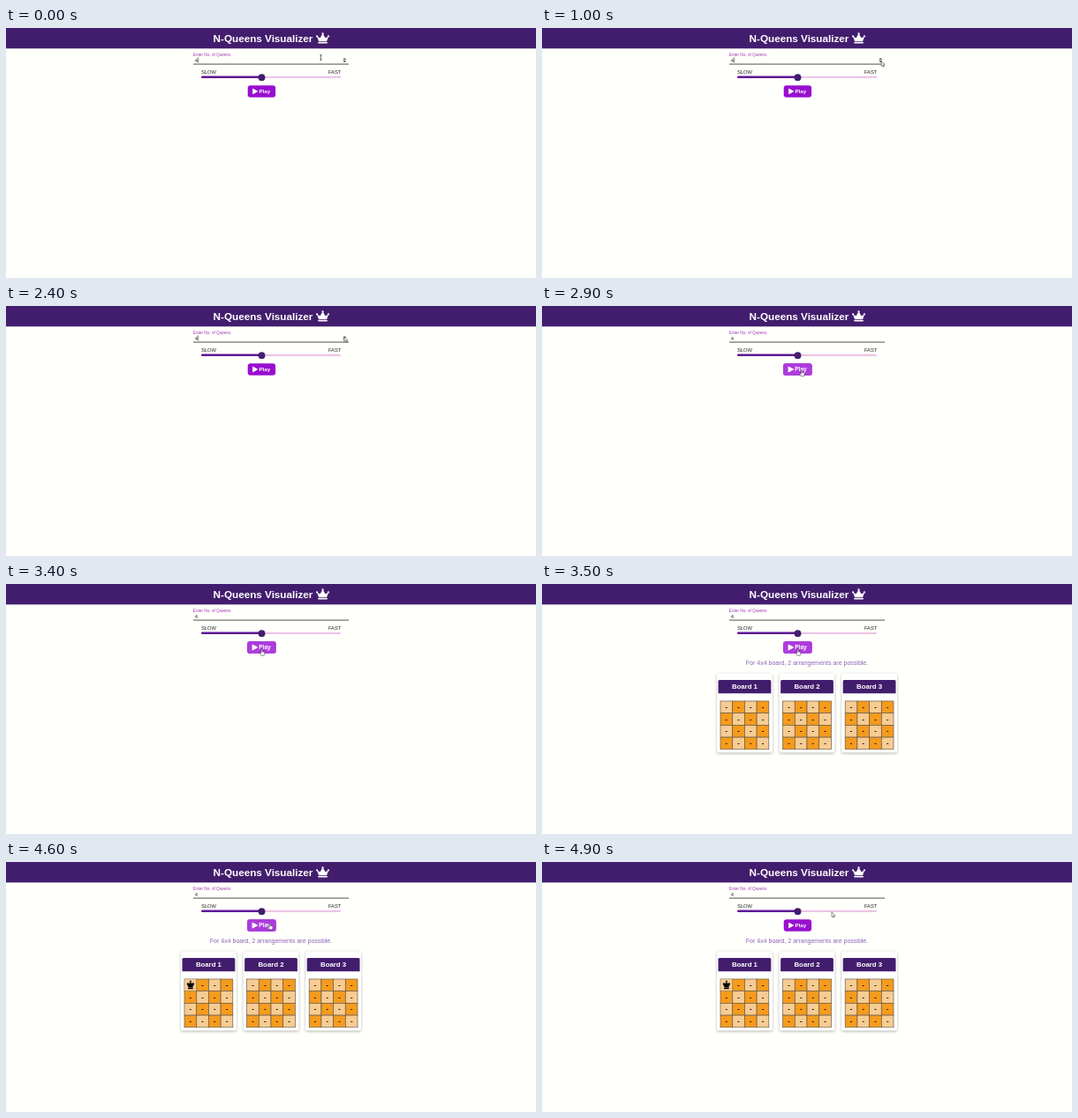
Write an HTML page that moves like this. It is 600x284 px and loops after 5000 ms.

```html
<!DOCTYPE html>
<html lang="en">
<head>
<meta charset="utf-8">
<title>N-Queens Visualizer</title>
<style>
  html, body { margin: 0; width: 100%; height: 100%; overflow: hidden; background: #fffffc; }
  svg { display: block; width: 600px; height: 284px; font-family: "Liberation Sans", Arial, sans-serif; }
  .bold { font-weight: bold; }
  .mid { text-anchor: middle; }
  .card { filter: drop-shadow(0 1px 1.5px rgba(0, 0, 0, .3)); }
</style>
</head>
<body>
<svg viewBox="0 0 600 284">
  <defs>
    <g id="crown">
      <path d="M128 416L56 222L92 196L164 239Q192 252 208 228L290 85H350L432 228Q448 252 476 239L548 196L584 222L512 416Z"/>
      <rect x="96" y="448" width="448" height="64" rx="16"/>
      <circle cx="48" cy="176" r="48"/><circle cx="320" cy="48" r="48"/><circle cx="592" cy="176" r="48"/>
    </g>
  </defs>

  <rect width="600" height="23.3" fill="#431d6d"/>
  <text class="bold" x="234.6" y="15.6" font-size="11.7" fill="#fff">N-Queens Visualizer</text>
  <use href="#crown" transform="translate(351 5.3) scale(.0236)" fill="#fff"/>

  <text x="211.8" y="31.6" font-size="4.7" fill="#a23bb5">Enter No. of Queens</text>
  <text x="213.7" y="38.5" font-size="5.9" fill="#222">4</text>
  <rect id="caret" x="216.9" y="33.4" width=".6" height="6" fill="#222"/>
  <g id="spin">
    <rect x="381" y="33.6" width="4.6" height="6" fill="#efefef"/>
    <path d="M381.6 36.1L383.3 34.2L385 36.1ZM381.6 37.1L383.3 39L385 37.1Z" fill="#444"/>
  </g>
  <rect x="212" y="40.6" width="176" height=".9" fill="#3a3a3a"/>

  <g font-size="5.75" fill="#222">
    <text x="220.9" y="51.7">SLOW</text>
    <text x="379.3" y="51.7" text-anchor="end">FAST</text>
  </g>
  <rect x="221" y="54.8" width="158" height="2.2" rx="1.1" fill="#ecc5e6"/>
  <rect x="221" y="54.5" width="69" height="2.6" rx="1.3" fill="#5e1a94"/>
  <circle cx="289.5" cy="56.2" r="3.9" fill="#431d6d"/>

  <g id="play">
    <rect id="face" x="273.7" y="65.3" width="31.4" height="13.4" rx="3"/>
    <path d="M279.6 69.3L284.7 72L279.6 74.7Z" fill="#fff" stroke="#fff" stroke-width="1" stroke-linejoin="round"/>
    <text class="bold" x="286.4" y="74.2" font-size="6.2" fill="#fff">Play</text>
  </g>

  <g id="result">
    <text class="mid" x="300" y="91.6" font-size="7.02" fill="#8d63b9">For 4x4 board, 2 arrangements are possible.</text>
    <g id="boards"></g>
    <g id="queen">
      <rect x="202.4" y="133.4" width="13" height="13" fill="#f7cc93"/>
      <circle cx="208.9" cy="135.7" r="1"/>
      <path d="M204.6 138.1L206.1 137.2L207.5 138L208.9 136.6L210.3 138L211.7 137.2L213.2 138.1L211.2 142.4H206.6Z"/>
      <rect x="206" y="142.7" width="5.8" height="1.5" rx=".5"/>
    </g>
  </g>

  <g id="cursor">
    <path id="beam" d="M-1.2 -2.8H1.2M0 -2.8V2.8M-1.2 2.8H1.2" fill="none" stroke="#333" stroke-width=".7"/>
    <path id="arrow" d="M0 0V5.6L1.3 4.4L2.2 6.4L3.1 6L2.2 4.1H4Z" fill="#fff" stroke="#222" stroke-width=".5"/>
    <path id="hand" d="M-.6 0Q0 -.6 .6 0V2.4L2.7 2.9Q3.3 3.2 3.2 4L2.6 6.8H-.8L-2.3 4.2Q-2.2 3.3 -1.3 3.6L-.6 4.2Z" fill="#fff" stroke="#222" stroke-width=".5"/>
  </g>
</svg>
<script>
const NS = "http://www.w3.org/2000/svg";
const LOOP = 5000, TICK = 100;
const $ = id => document.getElementById(id);

function add(parent, tag, attrs, text) {
  const el = document.createElementNS(NS, tag);
  for (const k in attrs) el.setAttribute(k, attrs[k]);
  if (text) el.textContent = text;
  return parent.appendChild(el);
}

function drawBoard(i) {
  const cell = 13.7;
  const g = add($("boards"), "g", { transform: `translate(${229.4 + i * 70.6} 0)` });
  add(g, "rect", { class: "card", x: -31.4, y: 101.5, width: 62.8, height: 90, rx: 1.5, fill: "#fff" });
  add(g, "path", { d: "M-29.9 124.2V110.5Q-29.9 109 -28.4 109H28.4Q29.9 109 29.9 110.5V124.2Z", fill: "#431d6d" });
  add(g, "text", { class: "bold mid", x: 0, y: 119.3, "font-size": 7.8, fill: "#fff" }, `Board ${i + 1}`);
  for (let n = 0; n < 16; n++) {
    const r = n >> 2, c = n % 4;
    const x = (c - 2) * cell, y = 133 + r * cell;
    add(g, "rect", {
      x, y, width: cell, height: cell,
      fill: (r + c) % 2 ? "#f59b1d" : "#f7cc93", stroke: "#6b5a43", "stroke-width": .7
    });
    add(g, "text", { class: "bold mid", x: x + cell / 2, y: y + 8.8, "font-size": 7.5 }, "-");
  }
}
[0, 1, 2].forEach(drawBoard);

// time, x, y, pointer shape
const path = [
  [0, 356.5, 33.5, "beam"],
  [300, 388, 39, "arrow"],
  [500, 396, 42, "arrow"],
  [800, 384.2, 38, "arrow"],
  [1700, 384.2, 38, "arrow"],
  [2000, 383, 35, "arrow"],
  [2400, 383, 35, "arrow"],
  [2500, 374, 45, "arrow"],
  [2900, 294, 73, "hand"],
  [3100, 289.6, 74.4, "hand"],
  [4500, 289.6, 74.4, "hand"],
  [4600, 299, 70, "hand"],
  [4700, 313, 63, "arrow"],
  [4900, 328, 56.8, "arrow"],
  [5000, 328, 56.8, "arrow"]
];

function pointer(t) {
  let i = path.length - 2;
  while (path[i][0] > t) i--;
  const [t0, x0, y0, kind] = path[i], [t1, x1, y1] = path[i + 1];
  const p = (t - t0) / (t1 - t0);
  return { x: x0 + (x1 - x0) * p, y: y0 + (y1 - y0) * p, kind };
}

const show = (id, on) => { $(id).style.display = on ? "" : "none"; };

function render(t) {
  const { x, y, kind } = pointer(t);
  $("cursor").setAttribute("transform", `translate(${x} ${y})`);
  for (const k of ["beam", "arrow", "hand"]) show(k, k === kind);

  const hover = kind === "hand";
  $("face").setAttribute("fill", hover ? "#ad3cdb" : "#990fd0");
  $("play").setAttribute("transform",
    hover ? "translate(289.4 72) scale(1.05) translate(-289.4 -72)" : "");

  show("caret", t < 3200 && t % 1000 < 500);
  show("spin", t < 2600);
  show("result", t >= 3500);
  show("queen", t >= 4000);
}

const start = performance.now();
function loop() {
  const t = (performance.now() - start) % LOOP;
  render(Math.floor(t / TICK) * TICK);
  requestAnimationFrame(loop);
}
loop();
</script>
</body>
</html>
```
